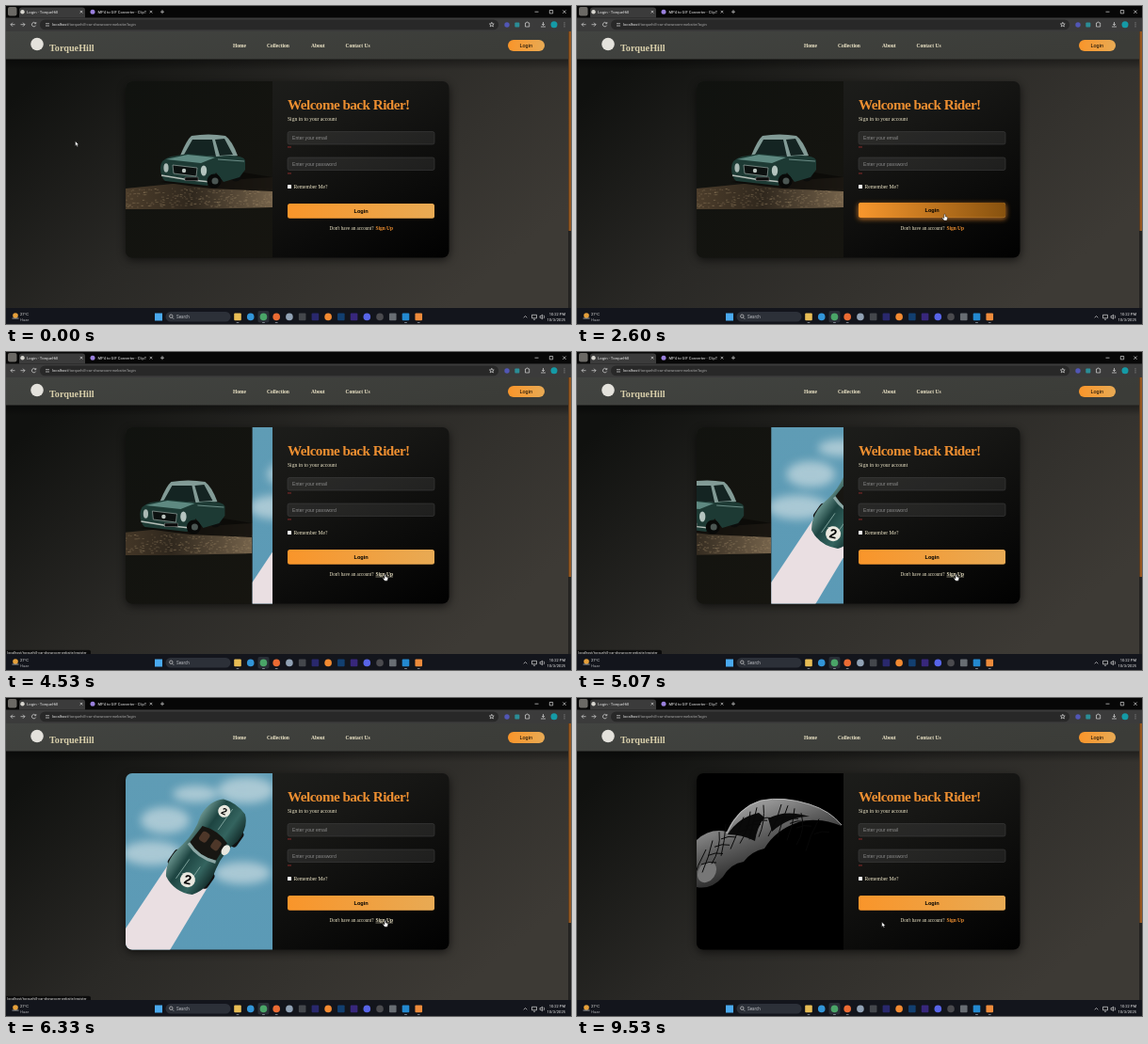
An HTML page that plays this animation: 600 by 338 pixels, repeating every 10000 ms.

```html
<!DOCTYPE html>
<html lang="en">
<head>
<meta charset="utf-8">
<title>Login</title>
<style>
  html, body { margin: 0; width: 100%; height: 100%; overflow: hidden; background: #111; }
  svg { display: block; width: 100vw; height: 100vh; }
  text { white-space: pre; }
  .serif { font-family: "Liberation Serif", serif; fill: #eee6c8; }
  .sans { font-family: "Liberation Sans", sans-serif; }
  .ui { font-family: Roboto, sans-serif; fill: #e6e6e6; }
  .bold { font-weight: bold; }
  .hint { font-size: 5.1px; fill: #8b8b8b; }
  .line { fill: none; stroke: #d8d8d8; stroke-width: .7; }
</style>
</head>
<body>
<svg viewBox="0 0 600 338" preserveAspectRatio="none">
  <defs>
    <linearGradient id="page" gradientUnits="userSpaceOnUse" x1="100" y1="20" x2="400" y2="380">
      <stop stop-color="#10110f"/><stop offset=".45" stop-color="#2a2926"/><stop offset="1" stop-color="#3d3a35"/>
    </linearGradient>
    <linearGradient id="header" x2="1" y2=".3">
      <stop stop-color="#424441"/><stop offset="1" stop-color="#3b3c38"/>
    </linearGradient>
    <linearGradient id="drop" x2="0" y2="1">
      <stop stop-color="#000" stop-opacity=".4"/><stop offset="1" stop-color="#000" stop-opacity="0"/>
    </linearGradient>
    <linearGradient id="orange"><stop stop-color="#f9952a"/><stop offset="1" stop-color="#e8aa54"/></linearGradient>
    <linearGradient id="orangeHot"><stop stop-color="#f8972d"/><stop offset="1" stop-color="#87520f"/></linearGradient>
    <linearGradient id="form" x2="1" y2="1">
      <stop stop-color="#222320"/><stop offset=".45" stop-color="#171715"/><stop offset="1" stop-color="#010101"/>
    </linearGradient>
    <linearGradient id="join" x2="1" y2=".7">
      <stop stop-color="#31302d"/><stop offset=".8" stop-color="#070707"/>
    </linearGradient>
    <linearGradient id="road"><stop stop-color="#4c3d2b"/><stop offset=".45" stop-color="#2f271d"/><stop offset="1" stop-color="#75634b"/></linearGradient>
    <linearGradient id="night" x2="1" y2="1"><stop stop-color="#10120f"/><stop offset="1" stop-color="#161510"/></linearGradient>
    <linearGradient id="sky" x2="0" y2="1"><stop stop-color="#5f9cb5"/><stop offset="1" stop-color="#5b9ab6"/></linearGradient>
    <linearGradient id="green"><stop stop-color="#66908a"/><stop offset=".3" stop-color="#1d4441"/><stop offset=".7" stop-color="#34645f"/><stop offset="1" stop-color="#15302e"/></linearGradient>
    <linearGradient id="silver" x2=".6" y2="1"><stop stop-color="#c9c9c9"/><stop offset=".5" stop-color="#5d5d5d"/><stop offset="1" stop-color="#060606"/></linearGradient>
    <filter id="soft" x="-40%" y="-60%" width="180%" height="220%"><feGaussianBlur stdDeviation="5"/></filter>
    <filter id="glow" x="-10%" y="-60%" width="120%" height="220%"><feGaussianBlur stdDeviation="2.5"/></filter>
    <clipPath id="photo"><path d="M283 80H134a7 7 0 0 0-7 7V260.500a7 7 0 0 0 7 7H283Z"/></clipPath>
    <clipPath id="frame"><rect y="80" width="156" height="188"/></clipPath>
  </defs>

  <rect y="27" width="600" height="295" fill="url(#page)"/>
  <rect y="56" width="597" height="12" fill="url(#drop)"/>
  <rect y="27" width="597" height="29.500" fill="url(#header)"/>
  <circle cx="33" cy="40.500" r="6.800" fill="#e4e2dc"/>
  <g class="serif bold" font-size="5.5">
    <text x="46" y="48" font-size="10.200" fill="#d8cfab">TorqueHill</text>
    <text x="241" y="44">Home</text><text x="277" y="44">Collection</text>
    <text x="324" y="44">About</text><text x="360.500" y="44">Contact Us</text>
  </g>
  <rect x="533" y="36" width="39" height="12" rx="6" fill="url(#orange)"/>
  <text class="sans" x="545.500" y="43.800" font-size="5.500">Login</text>
  <rect x="597" y="27" width="3" height="295" fill="#242321"/>
  <rect x="597.500" y="27" width="2.500" height="212" fill="#95571f"/>

  <g id="loginPage">
    <rect x="127" y="83" width="344" height="187" rx="8" opacity=".6" filter="url(#soft)"/>
    <rect x="127" y="80" width="343.500" height="187.500" rx="7" fill="url(#form)"/>
    <g clip-path="url(#photo)"><g id="strip">
      <g clip-path="url(#frame)">
        <rect y="80" width="156" height="188"/>
        <path d="M0 151Q14 138 32 142Q44 116 68 109Q92 104 120 113Q144 121 154 136Q128 126 108 132Q84 140 72 160Q58 163 50 174Q36 176 28 190Q16 204 0 201Z" fill="url(#silver)"/>
        <path d="M33 145Q44 127 66 122L72 127Q64 138 62 152Q48 145 33 145ZM76 128Q94 118 120 126Q98 126 80 142Z" fill="#0a0a0a"/>
        <ellipse cx="11" cy="185" rx="9" ry="12" transform="rotate(35 11 185)" fill="#777"/>
        <g id="branches" fill="none" stroke="#080808"></g>
        <path d="M32 144Q44 116 68 109Q92 104 120 113Q142 120 154 135" fill="none" stroke="#ccc" stroke-width=".8"/>
      </g>
      <g transform="translate(156)" clip-path="url(#frame)">
        <rect y="80" width="156" height="188" fill="url(#night)"/>
        <path d="M0 194L60 188L156 182V214L70 216H0Z" fill="url(#road)"/>
        <path id="gravel" fill="none" stroke="#a08a68" stroke-width=".6" opacity=".55"/>
        <path d="M36 187L90 194L156 197V182L120 176Z" fill="#0b0a08" opacity=".85"/>
        <circle cx="117" cy="180" r="6.500" fill="#0c0d0c"/>
        <path d="M58 159Q65 142 70 138Q88 135 106 138Q113 143 119 159L100 165Z" fill="#829b96"/>
        <path d="M62 158L71 142H92L96 160ZM95 142L105 141L114 158L100 159Z" fill="#142422"/>
        <path d="M37 172Q37 163 48 160L66 157L97 160Q124 157 127 164V174L121 182L104 187L96 177L87 191L42 186Q37 182 37 172Z" fill="#1d3a34"/>
        <path d="M43 163L66 158L95 161L80 167Z" fill="#5e8981"/>
        <path d="M98 163L126 165" stroke="#7fa39c" stroke-width=".8"/>
        <path d="M50 169L76 172L75 181L51 178Z" fill="#0c1110" stroke="#aebbb6" stroke-width=".6"/>
        <circle cx="62" cy="175" r="2.200" fill="#bac3be"/>
        <ellipse cx="43" cy="172" rx="2.600" ry="4.800" fill="#aab9b4"/>
        <ellipse cx="83" cy="175" rx="3.200" ry="5.600" fill="#b4c4bf"/>
        <path d="M38 180L62 184L90 187" fill="none" stroke="#b6beb8" stroke-width="1.400"/>
        <rect x="63" y="182" width="14" height="3.800" fill="#0a0a0a" stroke="#999" stroke-width=".4"/>
        <circle cx="94" cy="186" r="7.500" fill="#080908"/><circle cx="95" cy="186" r="3.500" fill="#4a5552"/>
      </g>
      <g transform="translate(312)" clip-path="url(#frame)">
        <rect y="80" width="156" height="188" fill="url(#sky)"/>
        <g fill="#dde7e9" opacity=".6" filter="url(#soft)">
          <ellipse cx="28" cy="165" rx="32" ry="13"/><ellipse cx="42" cy="130" rx="26" ry="14"/>
          <ellipse cx="124" cy="186" rx="30" ry="12"/><ellipse cx="128" cy="98" rx="30" ry="14"/>
          <ellipse cx="74" cy="102" rx="24" ry="9"/>
        </g>
        <path d="M46 176L89 198L47 268H0V245Z" fill="#eadfe2"/>
        <g transform="translate(85 159) rotate(35)">
          <g fill="#111"><rect x="-25" y="18" width="10" height="19" rx="4"/><rect x="16" y="18" width="10" height="19" rx="4"/><rect x="17" y="-36" width="9" height="19" rx="4"/></g>
          <path d="M-14-53Q0-58 14-53Q25-44 24-25Q18-7 22 12Q28 35 17 49Q0 58-17 49Q-28 35-22 12Q-18-7-24-25Q-25-44-14-53Z" fill="url(#green)"/>
          <path d="M-16-17Q0-23 16-17L17 5Q0 12-17 5Z" fill="#171612"/>
          <path d="M-17 5Q0 12 17 5L18 8Q0 15-18 8Z" fill="#8ba7a5"/>
          <rect x="-12" y="-14" width="9" height="11" rx="3" fill="#4d3729"/><rect x="3" y="-14" width="9" height="11" rx="3" fill="#4d3729"/>
          <path d="M-7 20V45M7 20V45M0-50V-23" stroke="#86aaa4" stroke-width=".8"/>
          <g fill="#e9e8df"><circle cx="4" cy="39" r="8"/><circle cx="-6" cy="-43" r="6.500"/><ellipse cx="19" cy="-10" rx="4" ry="6"/></g>
        </g>
        <g class="sans bold" text-anchor="middle">
          <text x="66" y="198" font-size="14" transform="rotate(12 66 193)">2</text>
          <text x="105" y="124" font-size="10" transform="rotate(25 105 120)">2</text>
        </g>
      </g>
    </g></g>
    <text class="serif bold" x="299" y="110" font-size="15.200" letter-spacing="-.55" style="fill:#ee8f31">Welcome back Rider!</text>
    <text class="serif" x="299" y="121.800" font-size="5.600">Sign in to your account</text>
    <g id="loginFields"></g>
    <rect x="299" y="190" width="4" height="4" rx=".6" fill="#fff"/>
    <text class="serif" x="305.500" y="194" font-size="5.600">Remember Me?</text>
    <g id="submit">
      <rect id="halo" x="298" y="211" width="158" height="17" rx="4" fill="#f09030" filter="url(#glow)"/>
      <rect x="299" y="210" width="156" height="15.700" rx="2.500" fill="url(#orange)"/>
      <rect id="hot" x="299" y="210" width="156" height="15.700" rx="2.500" fill="url(#orangeHot)"/>
      <text class="sans bold" x="369.500" y="219.500" font-size="5.600">Login</text>
    </g>
    <text class="serif" x="343.500" y="238" font-size="5.050">Don't have an account?</text>
    <text class="serif bold" id="signUp" x="392.500" y="238" font-size="5.400">Sign Up</text>
    <path id="underline" d="M392.500 239H411" stroke="#eee6c8" stroke-width=".5"/>
  </g>

  <g id="registerPage">
    <rect x="221" y="100" width="156" height="156" rx="13" opacity=".5" filter="url(#soft)"/>
    <rect x="221" y="97" width="156" height="156" rx="13" fill="url(#join)"/>
    <text class="serif bold" x="261.500" y="117" font-size="11.100" style="fill:#ee8f31">Create Account</text>
    <text class="serif bold" x="277.500" y="127.500" font-size="5.300">Join the ride today</text>
    <g id="registerFields"></g>
    <rect x="280" y="214.500" width="37.500" height="14.500" rx="2.500" fill="url(#orange)"/>
    <text class="sans bold" x="287.500" y="223.700" font-size="5.600">Register</text>
    <text class="serif" x="265" y="241" font-size="5.100">Already have an account?</text>
    <text class="serif bold" x="319.300" y="241" font-size="5.600" style="fill:#fff">Login</text>
  </g>

  <!-- browser chrome -->
  <rect width="600" height="12.500" fill="#070707"/>
  <rect x="2" y="1" width="9.500" height="9.500" rx="2" fill="#6b6965"/>
  <path d="M14 12.500V4Q14 1.500 17 1.500H81Q84 1.500 84 4V12.500Z" fill="#3b3b3b"/>
  <circle id="favicon" cx="17.500" cy="6.200" r="2.200" fill="#d6d4ce"/>
  <text class="ui" id="tab" x="22" y="7.900" font-size="4.300"></text>
  <circle cx="92" cy="6.200" r="2.500" fill="#9a80dd"/>
  <text class="ui" x="97.500" y="7.900" font-size="4.100">MP4 to GIF Converter - ClipT</text>
  <path class="line" d="M78.700 4.900l2.600 2.600m0-2.600l-2.600 2.600M152.700 4.900l2.600 2.600m0-2.600l-2.600 2.600M164 6.200h4m-2-2v4M561.500 6.200h4M577.300 4.500h3.400v3.400h-3.400zM591.300 4.500l3.400 3.400m0-3.400l-3.400 3.400"/>
  <rect y="12.500" width="600" height="14.500" fill="#3b3b3b"/>
  <rect x="36" y="14.500" width="487" height="10.700" rx="5.300" fill="#282828"/>
  <path class="line" d="M9.500 19.700H5m2-2l-2 2l2 2M15.500 19.700H20m-2-2l2 2l-2 2M31.300 18.300a2.200 2.200 0 1 0 .3 2.300M31.800 17v1.700h-1.700M42 18.700h4m-4 2.300h4M515.800 17.300l.7 1.700h1.700l-1.300 1.200.5 1.700-1.600-1-1.600 1 .5-1.700-1.300-1.200h1.700zM551.500 18h1a1 1 0 1 1 2 0h1.200v4h-4.200zM570.500 17v3.500m-1.500-1.500l1.500 1.500 1.500-1.500M568 22h5M593 17.500v.8m0 1.200v.8m0 1.200v.8"/>
  <circle cx="532" cy="20" r="2.700" fill="#5156b5"/><rect x="540.300" y="17.500" width="5" height="5" rx="1" fill="#2b8d96"/>
  <circle cx="582" cy="19.700" r="3.500" fill="#159aa6"/>
  <text class="ui" x="49" y="21.300" font-size="4.100">localhost<tspan id="url" fill="#a8a8a8"></tspan></text>
  <g id="status">
    <path d="M0 316.800H88Q90 316.800 90 318.500V322H0Z" fill="#0b0b0b"/>
    <text class="ui" id="link" x="1.300" y="320.900" font-size="3.700"></text>
  </g>

  <!-- taskbar -->
  <rect y="321" width="600" height="17" fill="#13151c"/>
  <circle cx="10" cy="329" r="2.800" fill="#e6a03a"/><path class="line" d="M6.500 332h7"/>
  <g class="ui" font-size="4.100">
    <text x="15" y="329.300">27°C</text><text x="15" y="334.600" style="fill:#a5a7ab">Haze</text>
    <text x="594" y="329.300" text-anchor="end">10:22 PM</text><text x="594" y="334.600" text-anchor="end">10/3/2025</text>
  </g>
  <rect x="158" y="326.500" width="8" height="8" fill="#4aa9ee"/>
  <rect x="169.500" y="325" width="69" height="10.500" rx="5.200" fill="#2c3038"/>
  <path class="line" d="M176.600 331.200l1.500 1.500M177 329.700a1.700 1.700 0 1 1-3.400 0a1.700 1.700 0 1 1 3.400 0"/>
  <text class="ui" x="181" y="332" font-size="4.500" style="fill:#b9bbc0">Search</text>
  <g id="apps"></g>
  <path class="line" d="M549.700 331.300l1.800-1.800 1.800 1.800M558.500 328.300h5v3.500h-5zM560 333.200h2M567 329.500h1l1.500-1.300v4.500l-1.500-1.300h-1zM571 328.700q1.300 1.700 0 3.400"/>

  <g id="cursor" stroke="#000" stroke-width=".45" fill="#fff">
    <path id="arrow" d="M0 0V5.400L1.200 4.300L2.100 6.200L3 5.800L2.200 4L3.800 3.900Z"/>
    <path id="hand" d="M-.7 0Q0-.7.7 0V2.200L2.700 2.800Q3.300 3 3 4.200L2.300 6.500H-.7L-2.600 3.900Q-2.300 3-1.500 3.500L-.7 4.100Z"/>
  </g>
</svg>
<script>
const $ = id => document.getElementById(id);
const site = '/torquehill-car-showroom-website/';
const show = (id, on) => { $(id).style.display = on ? '' : 'none'; };
const clamp = v => Math.max(0, Math.min(1, v));
const ramp = (t, from, to) => clamp((t - from) / (to - from));
const smooth = p => p * p * (3 - 2 * p);

let seed = 7;
const random = () => (seed = seed * 16807 % 2147483647) / 2147483647;

const field = (x, y, w, h, hint, stroke) =>
  `<rect x="${x}" y="${y}" width="${w}" height="${h}" rx="2" fill="#fff" fill-opacity=".08" stroke="${stroke}" stroke-width=".5"/>
   <text class="sans hint" x="${x + 5}" y="${y + h / 2 + 1.800}">${hint}</text>`;

$('loginFields').innerHTML = ['email', 'password'].map((name, i) => {
  const y = 133.500 + 27.500 * i;
  return field(299, y, 156, 13.500, 'Enter your ' + name, '#444') +
    `<text class="sans" x="299" y="${y + 19.500}" font-size="5" fill="#c23434">**</text>`;
}).join('');

$('registerFields').innerHTML = [
  'Enter a username (min 3 characters)', 'Enter a valid email',
  'Password (at least 8 characters)', 'Re-enter your password'
].map((hint, i) => field(233, 129.700 + 21.300 * i, 131.500, 14.700, hint, 'none')).join('');

// tree shadows across the bodywork
$('branches').innerHTML = Array.from({ length: 13 }, (_, i) => {
  const x = i * 10 - 4, y = 165 - 48 * Math.sin(i / 5);
  return `<path d="M${x} ${y + 30}q${4 + i % 3 * 3}-16 ${14 - i % 4 * 3}-34m-5 16q8-4 16-2"/>`;
}).join('');

$('gravel').setAttribute('d', Array.from({ length: 260 }, () =>
  `M${random() * 156} ${194 + random() * 20}h${1 + random() * 2}`).join(''));

const appColors = ['#e8bd55', '#3295d8', '#4aa568', '#eb6b33', '#91a2b5', '#44474c', '#29286d', '#f38a31',
  '#123f70', '#38277c', '#5865e8', '#4a4a4e', '#686d73', '#2389d0', '#ee8b3b'];
const squares = [0, 5, 6, 8, 9, 12, 13, 14], running = [0, 2, 3, 13, 14];
$('apps').innerHTML = appColors.map((color, i) => {
  const x = 246 + 13.730 * i, r = squares.includes(i) ? 1 : 4;
  return (i === 2 ? `<rect x="${x - 6}" y="324" width="12" height="12.500" rx="2" fill="#2a2f37"/>` : '') +
    `<rect x="${x - 3.800}" y="326.600" width="7.600" height="7.600" rx="${r}" fill="${color}"/>` +
    (running.includes(i) ? `<rect x="${x - 1.500}" y="336" width="3" height=".8" rx=".4" fill="#9aa2ad"/>` : '');
}).join('');

// cursor stops: time, x, y
const stops = [[0, 73.500, 143.500], [70, 73.500, 143.500], [1100, 390.500, 221.500], [2600, 390.500, 221.500],
  [3600, 402.700, 236.700], [6600, 402.700, 236.700], [7350, 323, 242], [8800, 323, 242], [9400, 323.700, 238], [10000, 323.700, 238]];

function cursorAt(t) {
  const i = stops.findIndex(s => s[0] > t);
  const [t0, x0, y0] = stops[i - 1], [t1, x1, y1] = stops[i];
  const p = smooth(ramp(t, t0, t1));
  return [x0 + (x1 - x0) * p, y0 + (y1 - y0) * p];
}

function draw(now) {
  const t = now % 10000;
  const register = t >= 6600 && t < 8800;
  const onSignUp = t >= 3400 && t < 6600;
  const onLogin = t >= 7250 && t < 8800;
  const onButton = t >= 860 && t < 2900;

  show('loginPage', !register);
  show('registerPage', register);
  show('favicon', t < 6600 || t >= 9530);
  $('tab').textContent = register ? 'Create Account' : 'Login - TorqueHill';
  $('url').textContent = site + (register ? 'register' : 'login');

  show('status', onSignUp || onLogin);
  $('link').textContent = 'localhost' + site + (register ? 'login' : 'register');
  $('signUp').style.fill = onSignUp ? '#eee6c8' : '#ee8f31';
  show('underline', onSignUp);

  const slide = t >= 8800 ? 0 : 1 + ramp(t, 4320, 5845);
  $('strip').setAttribute('transform', `translate(${127 - 156 * slide})`);

  const heat = ramp(t, 860, 1100) - ramp(t, 2900, 3150);
  $('submit').setAttribute('transform', `translate(0 ${-heat})`);
  $('halo').style.opacity = heat * .65;
  $('hot').style.opacity = heat;

  const pointing = onSignUp || onLogin || onButton;
  show('hand', pointing);
  show('arrow', !pointing);
  $('cursor').setAttribute('transform', `translate(${cursorAt(t)})`);
}

const start = performance.now();
function tick() {
  draw(performance.now() - start);
  requestAnimationFrame(tick);
}
tick();
</script>
</body>
</html>
```
